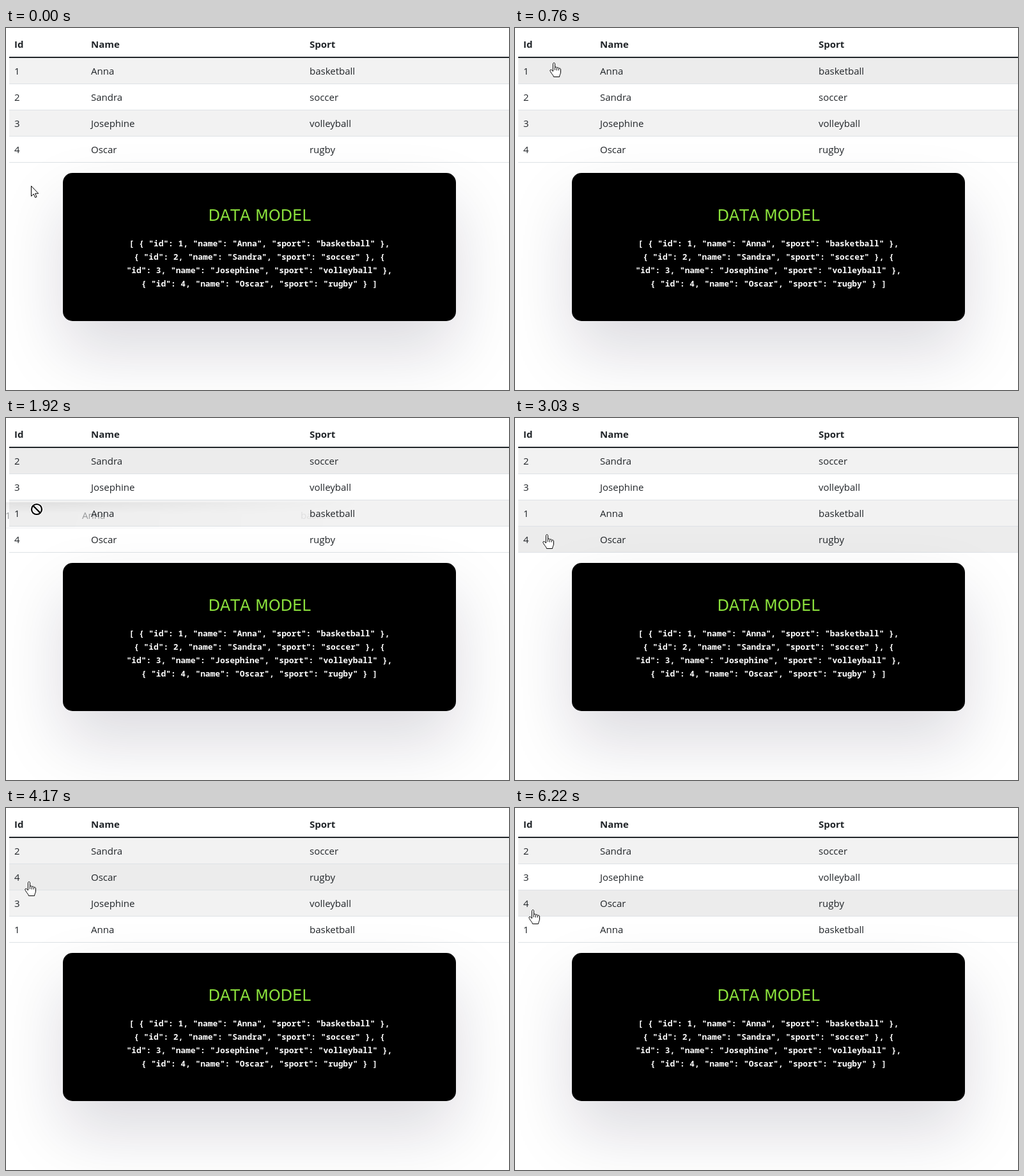
Recreate the animation shown at these times as an HTML page. Size 787 px wide and 567 px high, loop 7150 ms.

```html
<!DOCTYPE html>
<html lang="en">
<head>
<meta charset="utf-8">
<title>Sortable table</title>
<style>
html, body { margin: 0; width: 100%; height: 100%; overflow: hidden; background: #fff; }
#stage { position: relative; width: 787px; height: 567px; overflow: hidden; background: #fff;
  color: #212529; font: 15px/41px "Open Sans", "Noto Sans", sans-serif; }
.row { position: absolute; left: 5px; width: 782px; height: 41px; box-sizing: border-box;
  border-bottom: 1px solid #dee2e6; white-space: pre; }
.row span { position: absolute; top: 0; left: 8px; }
.row span:nth-child(2) { left: 128px; }
.row span:nth-child(3) { left: 470px; }
.head { top: 5px; height: 42px; border-bottom: 2px solid #212529; font-weight: 700; }
#ghost { background: linear-gradient(rgba(0, 0, 0, .14), rgba(0, 0, 0, .03) 45%); }
#model { position: absolute; left: 89px; top: 227px; width: 615px; height: 232px; border-radius: 15px;
  background: #000; box-shadow: rgba(17, 12, 46, .15) 0 48px 100px 0; text-align: center; }
#model h2 { position: absolute; top: 52px; width: 100%; margin: 0; color: #8be03c;
  font: 24px/30px "DejaVu Sans", sans-serif; font-kerning: none; }
#model pre { position: absolute; top: 100px; width: 100%; margin: 0; color: #fff;
  font: 600 12.83px/21px "Noto Sans Mono", monospace; }
#pointer { position: absolute; left: 0; top: 0; overflow: visible; }
</style>
</head>
<body>
<div id="stage">
  <div class="row head"><span>Id</span><span>Name</span><span>Sport</span></div>
  <div id="rows"></div>
  <div id="model">
    <h2>DATA MODEL</h2>
    <pre>[ { "id": 1, "name": "Anna", "sport": "basketball" },
{ "id": 2, "name": "Sandra", "sport": "soccer" }, {
"id": 3, "name": "Josephine", "sport": "volleyball" },
{ "id": 4, "name": "Oscar", "sport": "rugby" } ]</pre>
  </div>
  <div id="ghost" class="row"></div>
  <svg id="pointer" width="1" height="1" fill="#fff" stroke="#000" stroke-linejoin="round">
    <path id="arrow" d="M.5.5V16.5L4.2 13 6.7 18.5 9 17.5 6.6 12.2H11.7Z"/>
    <path id="hand" d="M-1.5 14V2.2C-1.5 0 1.5 0 1.5 2.2V8C2.2 6.7 4.5 6.8 4.5 8.6
      C5.2 7.4 7.5 7.8 7.5 9.6C8.2 8.6 10.5 9 10.5 11V15C10.5 18 8.8 19 8.5 22.5H-.5
      C-1 20-3 18.5-4.5 16C-6 13.5-6.6 12.6-5.8 11.8C-4.6 10.6-3 12-1.5 14ZM1.5 8V12M4.5 8.6V12.5M7.5 9.6V12.5"/>
    <g id="blocked" fill="none">
      <path id="sign" stroke="#fff" stroke-width="4.4" d="M-8 0A8 8 0 1 1 8 0A8 8 0 1 1-8 0M-5.6-5.6L5.6 5.6"/>
      <path stroke-width="2.2" d="M-8 0A8 8 0 1 1 8 0A8 8 0 1 1-8 0M-5.6-5.6L5.6 5.6"/>
    </g>
  </svg>
</div>
<script>
const LOOP = 7150, TOP = 47, ROW = 41;
const people = [[1, 'Anna', 'basketball'], [2, 'Sandra', 'soccer'],
  [3, 'Josephine', 'volleyball'], [4, 'Oscar', 'rugby']];

// Pointer path: time, x, y
const path = [
  [0, 39, 247], [470, 39, 247], [760, 61, 54], [1200, 61, 54], [1260, 62, 57],
  [1550, 62, 58], [1920, 48, 143], [2010, 46, 147], [2710, 46, 147], [3030, 50, 182],
  [3130, 50, 182], [3410, 44, 148], [3440, 44, 147], [4140, 36, 115], [5440, 36, 115],
  [5450, 35, 116], [5490, 35, 116], [5880, 28, 159], [LOOP, 28, 159]
];
const drags = [[1560, 2365], [3130, 4165], [5490, 6200]];

const $ = id => document.getElementById(id);
const rowAt = y => Math.floor((y - TOP) / ROW);
const cells = person => person.map(v => `<span>${v}</span>`).join('');

function pointerAt(t) {
  const i = path.findIndex(p => p[0] > t);
  const [t0, x0, y0] = path[i - 1], [t1, x1, y1] = path[i];
  const u = (t - t0) / (t1 - t0), k = u * u * (3 - 2 * u);
  return [x0 + (x1 - x0) * k, y0 + (y1 - y0) * k].map(Math.round);
}

function move(list, from, to) {
  const next = list.slice();
  next.splice(to, 0, next.splice(from, 1)[0]);
  return next;
}

const rows = people.map((_, i) => {
  const el = document.createElement('div');
  el.className = 'row';
  el.style.top = TOP + i * ROW + 'px';
  return $('rows').appendChild(el);
});

function setHTML(el, html) {
  if (el.shown !== html) el.innerHTML = el.shown = html;
}

function showGhost(person, slot, [gx, gy], [x, y]) {
  const top = TOP + slot * ROW, ghost = $('ghost');
  const mask = `radial-gradient(circle 510px at ${gx - 5}px ${gy - top}px, rgba(0,0,0,.5), transparent)`;
  setHTML(ghost, cells(person));
  ghost.style.top = top + 'px';
  ghost.style.transform = `translate(${x - gx}px, ${y - gy}px)`;
  ghost.style.webkitMaskImage = ghost.style.maskImage = mask;
}

function draw(t) {
  const [x, y] = pointerAt(t);
  let order = people, hover = rowAt(y), dragging = false;
  for (const [start, end] of drags) {
    if (t < start) break;
    const grab = pointerAt(start), slot = rowAt(grab[1]);
    const person = order[slot];
    dragging = t < end;
    order = move(order, slot, rowAt(pointerAt(Math.min(t, end))[1]));
    if (dragging) {
      hover = slot;
      showGhost(person, slot, grab, [x, y]);
    }
  }
  rows.forEach((el, i) => {
    setHTML(el, cells(order[i]));
    el.style.background = i === hover ? '#ececec' : i % 2 ? '#fff' : '#f2f2f2';
  });
  const shape = dragging ? 'blocked' : hover < 4 ? 'hand' : 'arrow';
  for (const id of ['arrow', 'hand', 'blocked']) $(id).style.display = id === shape ? '' : 'none';
  $('ghost').style.display = dragging ? '' : 'none';
  $('pointer').style.transform = `translate(${x}px, ${y}px)`;
}

const began = performance.now();
function frame() {
  draw((performance.now() - began) % LOOP);
  requestAnimationFrame(frame);
}
frame();
</script>
</body>
</html>
```
